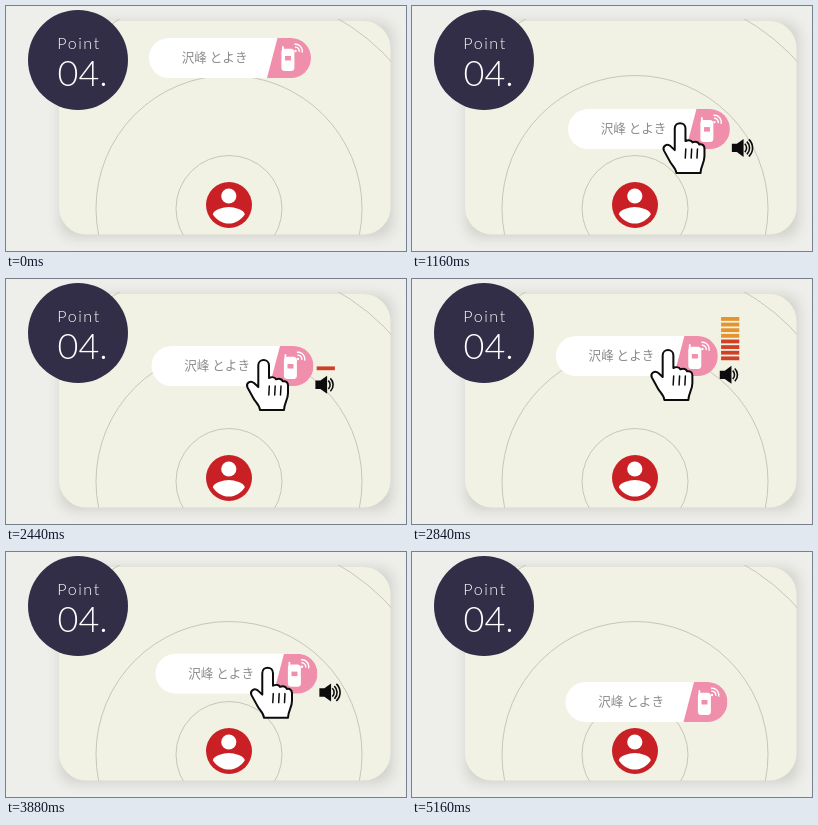
These frames come from a looping animation (400 by 245 pixels, 5400 ms). An HTML page with a canvas:

```html
<!DOCTYPE html>
<html lang="ja">
<head>
<meta charset="utf-8">
<title>Point 04</title>
<style>
  html, body { margin: 0; width: 100%; height: 100%; overflow: hidden; background: #eeeeea; }
  canvas { display: block; width: 400px; height: 245px; }
</style>
</head>
<body>
<canvas id="stage"></canvas>
<script>
const W = 400, H = 245, LOOP = 5400, TICK = 40;
const canvas = document.getElementById('stage');
const ctx = canvas.getContext('2d');
const dpr = window.devicePixelRatio || 1;
canvas.width = W * dpr;
canvas.height = H * dpr;

const PINK = '#f08fab';
const RED = '#c92025';
const BAR_COLORS = ['#cf4027', '#e5932c', '#ecc63a'];

// Keys: [time, value, ...]
const PILL = [
  [760, 143, 32], [1360, 160.5, 128], [1790, 160.5, 128], [2100, 145.5, 67],
  [2740, 145.5, 67], [3060, 138.5, 24], [3530, 138.5, 24], [4060, 153.5, 130]
];
const HAND_IN = [[200, 338, 171], [640, 237.5, 45]];
const HAND_OUT = [[4555, 248, 143], [4860, 344, 177.5]];
const LEVEL = [
  [1320, 0], [1800, 12], [1920, 12], [2360, 1], [2440, 1], [2720, 8], [2840, 8],
  [3160, 0], [3320, 4], [3480, 0], [4000, 0], [4480, 12], [4520, 12], [4840, 4]
];
const WAVES = [[800, 1], [960, 2], [1080, 3], [2000, 2], [3160, 1], [3720, 2], [3840, 3], [4840, 0]];

const linear = u => u;
const smooth = u => u * u * (3 - 2 * u);

function tween(keys, t, ease) {
  if (t <= keys[0][0]) return keys[0].slice(1);
  for (let i = 1; i < keys.length; i++) {
    const a = keys[i - 1], b = keys[i];
    if (t < b[0]) {
      const p = ease((t - a[0]) / (b[0] - a[0]));
      return a.slice(1).map((v, k) => v + (b[k + 1] - v) * p);
    }
  }
  return keys[keys.length - 1].slice(1);
}

function step(keys, t) {
  let value = 0;
  for (const [time, v] of keys) if (t >= time) value = v;
  return value;
}

function disc(x, y, r, color) {
  ctx.beginPath();
  ctx.arc(x, y, r, 0, Math.PI * 2);
  ctx.fillStyle = color;
  ctx.fill();
}

function fillBox(x, y, w, h, r) {
  ctx.beginPath();
  ctx.roundRect(x, y, w, h, r);
  ctx.fill();
}

function arcLine(x, y, r, from, to) {
  ctx.beginPath();
  ctx.arc(x, y, r, from, to);
  ctx.stroke();
}

function at(x, y, draw) {
  ctx.save();
  ctx.translate(x, y);
  draw();
  ctx.restore();
}

function drawCard() {
  ctx.fillStyle = '#eeeeea';
  ctx.fillRect(0, 0, W, H);

  // The shadow is squarer than the card, so its caster stays off stage.
  ctx.save();
  ctx.shadowColor = 'rgba(60, 60, 50, 0.17)';
  ctx.shadowBlur = 13 * dpr;
  ctx.shadowOffsetX = (W * 2 + 1.5) * dpr;
  ctx.shadowOffsetY = 2 * dpr;
  fillBox(53 - W * 2, 15, 331.5, 213.5, 14);
  ctx.restore();
  ctx.fillStyle = '#f1f1e4';
  fillBox(53, 15, 331.5, 213.5, 27);

  ctx.save();
  ctx.beginPath();
  ctx.rect(53, 13, 332, 216);
  ctx.clip();
  ctx.strokeStyle = '#c6c6bb';
  ctx.lineWidth = 1;
  for (const r of [53, 133, 219]) arcLine(223, 202.5, r, 0, Math.PI * 2);
  ctx.restore();
}

function drawBadge() {
  disc(72, 54, 50, '#322e47');
  ctx.fillStyle = '#fff';
  ctx.textBaseline = 'alphabetic';
  ctx.letterSpacing = '1.6px';
  ctx.font = '300 16px Lato, sans-serif';
  ctx.fillText('Point', 51.3, 42.8);
  ctx.letterSpacing = '0px';
  ctx.font = '300 36px Lato, sans-serif';
  ctx.fillText('04.', 51.5, 80.3);
}

const SHOULDERS = new Path2D('M-16 9.3A18.5 18.5 0 0 0 16 9.3C15.5 5 5.5 2 0 2S-15.5 5-16 9.3Z');

function drawUser() {
  disc(223, 199, 23, RED);
  disc(222.8, 190, 7.6, '#fff');
  at(222.8, 199, () => ctx.fill(SHOULDERS));
}

function drawRadio() {
  ctx.fillStyle = '#fff';
  fillBox(132.4, 10.8, 13, 22.2, 3.5);
  fillBox(133, 8, 1.8, 6, 0.9);
  ctx.fillStyle = PINK;
  ctx.fillRect(136, 18, 6, 4.5);
  disc(146.5, 13, 1.2, '#fff');
  ctx.strokeStyle = '#fff';
  ctx.lineWidth = 1.4;
  for (const r of [3.8, 6.8]) arcLine(146.5, 13, r, -Math.PI * 0.55, Math.PI * 0.08);
}

function drawPill() {
  ctx.save();
  ctx.fillStyle = '#fff';
  fillBox(0, 0, 162, 40, 20);
  ctx.clip();
  ctx.beginPath();
  ctx.moveTo(128.5, 0);
  ctx.lineTo(162, 0);
  ctx.lineTo(162, 40);
  ctx.lineTo(118, 40);
  ctx.fillStyle = PINK;
  ctx.fill();
  ctx.restore();
  ctx.fillStyle = '#8c8c8c';
  ctx.font = '400 12.6px "Noto Sans CJK JP", "Noto Sans CJK", sans-serif';
  ctx.fillText('沢峰 とよき', 32.7, 24);
  drawRadio();
}

function drawBars(count) {
  for (let i = 0; i < count; i++) {
    ctx.fillStyle = BAR_COLORS[Math.floor(i / 4)];
    ctx.fillRect(165.2, 20.4 - i * 5.63, 18.2, 3.8);
  }
}

const SPEAKER = new Path2D('M0-4.2H5L11.7-9V9L5 4.2H0Z');

function drawSpeaker(waves) {
  at(163.9, 38.8, () => {
    ctx.fillStyle = ctx.strokeStyle = '#0c0c0c';
    ctx.fill(SPEAKER);
    ctx.lineWidth = 1.6;
    for (let i = 0; i < waves; i++) arcLine(9, 0, 5.7 + i * 3, -0.82, 0.82);
  });
}

const HAND = new Path2D('M12.3 28V6.5C12.3-.8 23-.8 23 6.5V19C26 17.6 29 18.3 30 20.3' +
  'C33 19 36 20 36.8 22.3C40 21.6 42 23.5 42 26.5V34C42 41 38.5 43 38 51H14' +
  'C13.5 45.5 9 43 7 38.5L1.5 28.5C-.5 24 4.5 21 8 24Z');

function drawHand() {
  ctx.fillStyle = '#fff';
  ctx.fill(HAND);
  ctx.strokeStyle = '#0c0c0c';
  ctx.lineWidth = 2;
  ctx.lineJoin = ctx.lineCap = 'round';
  ctx.stroke(HAND);
  ctx.lineWidth = 1.5;
  ctx.beginPath();
  for (const x of [23.3, 29.2, 35]) {
    ctx.moveTo(x, 27);
    ctx.lineTo(x - 0.5, 36);
  }
  ctx.stroke();
}

function handPlace(t, x, y) {
  if (t < 200 || t >= 4840) return null;
  if (t < 640) return tween(HAND_IN, t, smooth);
  if (t > 4555) return tween(HAND_OUT, t, smooth);
  return [x + 94.5, y + 13];
}

function draw(t) {
  ctx.setTransform(dpr, 0, 0, dpr, 0, 0);
  drawCard();
  drawBadge();
  drawUser();

  const [x, y] = tween(PILL, t, smooth);
  at(x, y, () => {
    drawPill();
    if (t >= 800 && t < 5160) drawSpeaker(step(WAVES, t));
    if (t < 4840) drawBars(Math.round(tween(LEVEL, t, linear)[0]));
  });

  const hand = handPlace(t, x, y);
  if (hand) at(hand[0], hand[1], drawHand);
}

const start = performance.now();
function loop() {
  const t = (performance.now() - start) % LOOP;
  draw(Math.floor(t / TICK) * TICK);
  requestAnimationFrame(loop);
}
loop();
</script>
</body>
</html>
```
